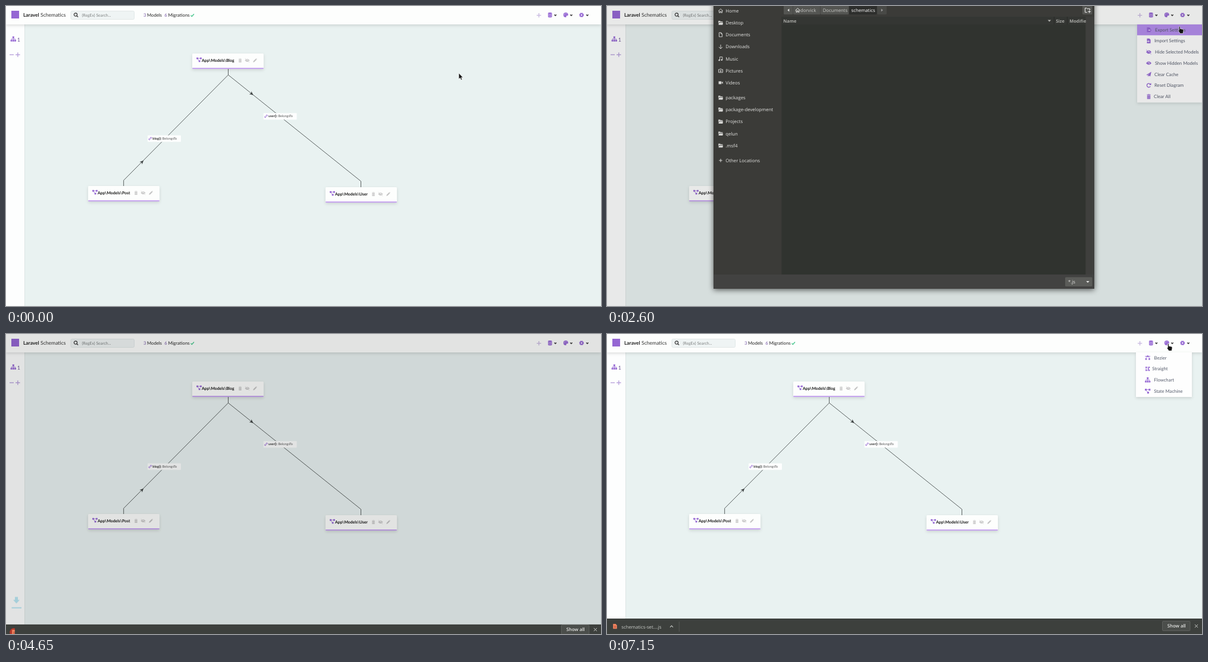
Animation, 1000 px wide and 505 px high, one loop 8000 ms. Source, as an HTML page:

```html
<!DOCTYPE html>
<html lang="en">
<head>
<meta charset="utf-8">
<title>Schematics</title>
<style>
html, body { margin: 0; width: 100%; height: 100%; overflow: hidden; background: #e9f2f1; }
svg { display: block; width: 100vw; height: 100vh; font: 7.7px Lato, sans-serif; text-rendering: geometricPrecision; }
text { white-space: pre; }
.b { font-weight: 700; }
.ui { font-family: "Open Sans", "Noto Sans", sans-serif; font-size: 7.75px; }
.ln { fill: none; stroke: currentColor; }
.menu { fill: #555b6b; }
.purple { color: #9567d3; }

.move, .arrow, .hand, .gears, .hover, .dialog, .rules, .dim, .shelf, .tools, .cover, .ring, .drop, .styles {
  animation: 8s linear infinite;
}
.arrow, .hand, .hover, .dialog, .rules, .ring { animation-timing-function: step-end; }
.move { animation-name: move; }
.arrow { animation-name: arrow; }
.hand { animation-name: hand; }
.gears { animation-name: gears; }
.hover { animation-name: hover; }
.dialog { animation-name: dialog; }
.rules { animation-name: rules; }
.dim { animation-name: dim; }
.shelf { animation-name: shelf; }
.tools { animation-name: tools; }
.cover { animation-name: cover; }
.ring { animation-name: ring; }
.drop { animation-name: drop; }
.styles { animation-name: styles; }

@keyframes move {
  0%, .3% { transform: translate(761px, 113px); animation-timing-function: ease-in-out; }
  10.6%, 19% { transform: translate(971px, 15px); }
  23.7%, 26% { transform: translate(962px, 38px); }
  29.3%, 39.3% { transform: translate(960px, 34px); }
  40%, 43.5% { transform: translate(946px, 26px); }
  46.5% { transform: translate(800px, -20px); }
  70.6% { transform: translate(862px, 5px); }
  71.8%, 82.8% { transform: translate(924px, 25px); }
  84.9%, 100% { transform: translate(941px, 16px); }
}
@keyframes arrow {
  0%, 39.375%, 70.625% { opacity: 1; }
  10%, 46.5%, 84.375%, 100% { opacity: 0; }
}
@keyframes hand {
  0%, 39.375% { opacity: 0; }
  10%, 84.375%, 100% { opacity: 1; }
}
@keyframes gears {
  0%, 11.1% { opacity: 0; }
  12.6%, 56.24% { opacity: 1; }
  56.25%, 100% { opacity: 0; }
}
@keyframes hover { 0% { opacity: 0; } 21.25%, 100% { opacity: 1; } }
@keyframes dialog { 0%, 56.25%, 100% { opacity: 0; } 32.5% { opacity: 1; } }
@keyframes rules { 0% { opacity: 0; } 39.375%, 100% { opacity: 1; } }
@keyframes dim {
  0%, 31.9% { opacity: 0; }
  32.5% { opacity: .08; }
  35.6%, 56.2% { opacity: .32; }
  58.125% { opacity: .105; }
  60%, 100% { opacity: 0; }
}
@keyframes shelf {
  0%, 56.7% { transform: translateY(27px); }
  58.125% { transform: translateY(10px); }
  59.4%, 100% { transform: none; }
}
@keyframes tools {
  0%, 56.7% { transform: translateY(24px); }
  58.125% { transform: translateY(6px); }
  59.4%, 100% { transform: none; }
}
@keyframes cover {
  0%, 57% { transform: none; }
  58.125% { transform: translateX(14px); }
  60%, 100% { transform: translateX(140px); }
}
@keyframes ring { 0% { opacity: 1; } 83.125% { opacity: .5; } 88.75%, 100% { opacity: 0; } }
@keyframes drop {
  0%, 56.3% { opacity: 0; transform: translateY(-18px); }
  58.125% { opacity: 1; transform: none; }
  60%, 100% { opacity: 0; transform: translateY(18px); }
}
@keyframes styles { 0%, 88.2% { opacity: 0; } 89.3%, 100% { opacity: 1; } }
</style>
</head>
<body>
<svg id="stage" viewBox="0 0 1000 505"></svg>
<script>
// Icons are drawn around their own centre, about 8px wide.
const fill = d => `<path fill="currentColor" d="${d}"/>`;
const line = (d, w = 1) => `<path class="ln" stroke-width="${w}" d="${d}"/>`;
const gap = (d, w = .8) => `<path fill="none" stroke="#fff" stroke-width="${w}" d="${d}"/>`;
const page = 'M-3-4H1L3-2V4H-3Z';
const eye = 'M-4.5 0Q0-5.6 4.5 0Q0 5.6-4.5 0Z';

const icons = {
  plus: line('M-3.7 0H3.7M0-3.7V3.7', 1.4),
  minus: line('M-3.5 0H3.5', 1.4),
  chevron: line('M-1.7-.8L0 .9L1.7-.8', 1.4),
  search: line('M1.8 1.8L4 4', 1.5) + '<circle class="ln" stroke-width="1.3" cx="-.6" cy="-.6" r="2.9"/>',
  check: line('M-2.7 .2L-.8 2L2.8-2', 1.3),
  db: fill('M-3.4-2.8C-3.4-4.6 3.4-4.6 3.4-2.8V2.8C3.4 4.6-3.4 4.6-3.4 2.8Z') + gap('M-3.4-1.6Q0-.2 3.4-1.6M-3.4 1.2Q0 2.6 3.4 1.2', .6),
  palette: fill('M4 0A4 4 0 1 0 0 4Q1.4 3.8.8 2.5Q.4 1.2 1.8 1.2H3Q4 1.1 4 0Z') + gap('M-2.6 0h1M-1.7-2h1M.9-2h1', 1),
  gear: '<circle class="ln" stroke-width="1.8" r="2.1"/><circle class="ln" stroke-width="1.4" stroke-dasharray="1.5 1.02" r="3.2"/>',
  tree: fill('M-1.5-4.3h3v2.7h-3ZM-4.6 1.5h2.7V4.2h-2.7ZM-1.4 1.5h2.8V4.2h-2.8ZM1.9 1.5h2.7V4.2H1.9Z') + line('M0-2V2M-3.2 1.5V0H3.2V1.5', .8),
  flow: fill('M-4.6-4h3v3h-3ZM1.6-4h3v3h-3ZM-.8 1h3v3h-3Z') + line('M-2-2.5H2M-2.6-1.5L.2 2', .8),
  trash: fill('M-3-3.6h2l.4-.6h1.2l.4 .6h2v1h-6ZM-2.7-2H2.7V4.2H-2.7Z') + gap('M-1.2-1V3.2M1.2-1V3.2', .5),
  eye: fill(eye) + gap('M-1.4 0A1.4 1.4 0 1 1 0 1.4', .8),
  eyeOff: fill(eye) + gap('M-1.2 .4A1.3 1.3 0 0 1 1.3-.3M-4-4.2L4.4 3.2', .7) + line('M-4.2-3.5L4.2 3.7', .8),
  pencil: fill('M-3.8 3.8L-3.2 1.4L1.5-3.2L3.3-1.4L-1.4 3.2ZM2-3.6L2.7-4.1L4.1-2.7L3.7-2Z'),
  output: fill(page) + gap('M-.6 .8H3', 1) + fill('M2.7-1.2L4.8 .8L2.7 2.8Z'),
  input: fill(page) + gap('M-4 .8H.4M-.7-.8L.9 .8L-.7 2.4', .9),
  plane: fill('M-4.2 1L4.3-4.2L2.6 3.6L0 2.3L-1.4 4.2V1.7L2.6-2.4L-2.2 1.7Z'),
  redo: line('M2.6-2.1A3.2 3.2 0 1 0 2.8 1.6', 1.3) + fill('M4-4.2V-.7H.5Z'),
  bezier: fill('M-1.3-3.7h2.6v2.5h-2.6ZM-4 1h2.5v2.7H-4ZM1.5 1H4v2.7H1.5Z') + line('M-4.4-2.4H4.4M-2.8 1Q-2.7-2-1-2.4M2.8 1Q2.7-2 1-2.4', .8),
  polygon: line('M-2.6-2.6H2.6L1 0L2.6 2.6H-2.6Z', .9) + fill('M-3.6-3.6h2v2h-2ZM1.6-3.6h2v2h-2ZM1.6 1.6h2v2h-2ZM-3.6 1.6h2v2h-2ZM0-1h2v2H0Z'),
  link: line('M-1.1 1.1L1.1-1.1M-.2-1.2L.9-2.3A1.4 1.4 0 0 1 2.4-.8L1.3 .2M.2 1.2L-.9 2.3A1.4 1.4 0 0 1-2.4 .8L-1.3-.2', .9),
  home: line('M-4 .3L0-3.4L4 .3M-2.7-.5V3.5H-.8V1H.8V3.5H2.7V-.5', 1),
  folder: fill('M-4-3.5H-1L0-2.4H3.6V-1H-3L-4 2.5ZM-2.6-.3H4.3L3.6 3.5H-3.8Z'),
  doc: line('M-2.7-3.7H.7L2.8-1.6V3.7H-2.7ZM.6-3.5V-1.4H2.6', 1),
  down: line('M0-3.8V3.4M-3.2 .4L0 3.6L3.2 .4', 1),
  music: line('M-1.5 2.5V-3.2H3V1.8', 1) + fill('M-4 2.6a1.5 1.3 0 1 0 3 0a1.5 1.3 0 1 0-3 0M.4 2a1.5 1.3 0 1 0 3 0a1.5 1.3 0 1 0-3 0'),
  camera: line('M-3.7-2.2H-1.8L-1-3.2H1L1.8-2.2H3.7V3H-3.7Z', 1) + '<circle class="ln" r="1.3" cy=".4"/>',
  video: fill('M-3.6-2.4H1.4V2.4H-3.6ZM1.6 0L4-2.2V2.2Z'),
};

const icon = (name, x, y, color = '', scale = 1) =>
  `<g transform="translate(${x} ${y}) scale(${scale})"${color && ` color="${color}"`}>${icons[name]}</g>`;
const text = (x, y, s, attrs = '') => `<text x="${x}" y="${y}" ${attrs}>${s}</text>`;
const rect = (x, y, w, h, color, attrs = '') =>
  `<rect x="${x}" y="${y}" width="${w}" height="${h}" fill="${color}" ${attrs}/>`;

const card = (x, y, name) => `<g transform="translate(${x} ${y})">
  ${rect(0, 0, 120, 26, '#fdfefd', 'rx="1.5" filter="url(#soft)"')}${rect(0, 24, 120, 2, '#c7a6ef', 'rx="1"')}
  ${icon('flow', 11.5, 10.5, '#9567d3', .95)}
  ${text(16, 14, 'App\\Models\\' + name, 'class="b" font-size="6.85" fill="#151515"')}
  ${icon('trash', 80.5, 11.7, '#cacaca', .8)}${icon('eyeOff', 92.5, 11.5, '#cacaca', .9)}${icon('pencil', 105.5, 11.5, '#c4c4c4', .85)}</g>`;

const label = (x, y, name) => `<g transform="translate(${x} ${y})">
  ${rect(0, 0, 56, 11, '#fdfefe', 'rx="1"')}${icon('link', 4.3, 5.4, '#9567d3')}
  <text x="8.3" y="7.3" font-size="5.55" fill="#555"><tspan class="b" fill="#333">${name}():</tspan> BelongsTo</text></g>`;

const head = (x, y, angle) =>
  `<path d="M0 0L-6.5-3L-4.6 0L-6.5 3Z" fill="#3f4444" transform="translate(${x} ${y}) rotate(${angle})"/>`;

const menu = (x, w, iconX, rows) =>
  rect(x, 31, w, rows.length * 18.75, '#fefefe', 'filter="url(#soft)"') +
  (rows.length > 4 ? rect(x, 31, w, 18.3, '#b48eec', 'class="hover"') : '') +
  rows.map(([name, tx, s], i) => {
    const y = 39.9 + i * 18.75;
    return `<g class="purple">${icon(name, iconX, y)}</g>` + text(tx, y + 2.7, s, 'class="menu"');
  }).join('');

const header = `
  ${rect(0, 0, 1000, 31, '#fdfefd', 'filter="url(#soft)"')}
  ${rect(9, 8, 13, 13, '#9567d3')}
  ${text(29, 18.2, 'Laravel', 'class="b" font-size="8.4" fill="#222"')}
  ${text(58, 18.2, 'Schematics', 'font-size="8.6" fill="#333"')}
  ${rect(109, 8.5, 106.5, 14, '#eff4f4', 'rx="2" stroke="#dce4e4" stroke-width=".8"')}
  ${icon('search', 117.5, 15, '#333', .9)}
  ${text(127.5, 17.7, '(RegEx) Search...', 'font-size="6.85" fill="#7d8080"')}
  ${text(231, 18, '3', 'fill="#7a5ca8"')}${text(237, 18, 'Models', 'fill="#222"')}
  ${text(266.3, 18, '6', 'fill="#7a5ca8"')}${text(272.4, 18, 'Migrations', 'fill="#222"')}
  ${icon('check', 313.2, 15.5, '#48c78e')}
  ${icon('plus', 895.6, 15.6, '#c8b9e0')}
  <g class="purple">${icon('db', 914.3, 15.2)}${icon('palette', 940.8, 15)}${icon('gear', 967.3, 15.2)}</g>
  ${[923.3, 950, 977].map(x => icon('chevron', x, 15.4, '#333')).join('')}`;

const diagram = `
  <path d="M373.5 106V116L197.7 293.5V303M373.5 116L596.5 295V305" fill="none" stroke="#4a5050" stroke-width=".9"/>
  ${head(231.2, 260, -45.3)}${head(415.6, 150, 38.7)}
  ${label(238, 217.7, 'blog')}${label(432.7, 180.2, 'user')}
  ${card(313, 80, 'Blog')}${card(138, 303, 'Post')}${card(537, 305, 'User')}`;

const side = `
  ${rect(0, 31, 31, 474, '#fdfefe')}${rect(31, 31, .8, 474, '#d9e2e1')}
  ${icon('tree', 12.3, 55.5, '#9567d3')}${text(18.8, 59.8, '1', 'font-size="9" fill="#6f5a95"')}
  ${icon('minus', 9.5, 82, '#b9a4dd')}${icon('plus', 19.8, 82, '#b9a4dd')}`;

const places = [
  [8, 'home', 'Home'], [28.3, 'folder', 'Desktop'], [48.3, 'doc', 'Documents'], [68.6, 'down', 'Downloads'],
  [88.8, 'music', 'Music'], [109, 'camera', 'Pictures'], [129.1, 'video', 'Videos'],
  [154.3, 'folder', 'packages'], [174.4, 'folder', 'package-development'], [194.6, 'folder', 'Projects'],
  [214.7, 'folder', 'qelun'], [235, 'folder', '.msf4'], [260, 'plus', 'Other Locations'],
];
const crumb = (x, w, color = '#545552') => rect(x, -6, w, 20.3, color, 'rx="1.5"');

const dialog = `<g class="dialog ui" fill="#e4e4e2">
  ${rect(179, -30, 640, 506, '#3a3a38', 'filter="url(#deep)"')}
  ${rect(179, 452, 640, 24, '#424241')}
  ${rect(293.5, 18, 511, 434, '#30332f')}${rect(293.5, 18, 511, 13, '#343633')}
  ${rect(804.5, 18, 14.5, 434, '#3f3f3d')}
  ${crumb(297, 15.5)}${crumb(313, 45.5)}${crumb(359, 47.3)}${crumb(407, 46.5, '#2d2e2c')}${crumb(454, 16, '#484946')}${crumb(799, 16.5)}
  <path d="M306.3 4.5V9.5L303.3 7Z"/><path d="M460.8 4.5V9.5L463.8 7Z" fill="#999"/>
  ${icon('home', 320.5, 7, '#e8e8e6', .95)}
  ${text(325, 9.9, 'dorvick', 'fill="#c9c9c6"')}${text(362.7, 9.9, 'Documents', 'fill="#c9c9c6"')}
  ${text(410.5, 9.9, 'schematics', 'fill="#fff"')}
  <path class="ln" color="#eee" d="M807 10.7H803.5V3.5H806L807 4.7H811.5V7M808.5 9.5H813M810.7 7.3V11.8"/>
  <g class="b" fill="#a9aaa6" font-size="7.4">${text(296.3, 27.7, 'Name')}${text(754.5, 27.7, 'Size')}${text(777.3, 27.7, 'Modifie')}</g>
  <path d="M740.7 23.5H746.3L743.5 26.5Z" fill="#b5b5b2"/>
  ${rect(751, 18, .8, 13, '#272926')}${rect(773, 18, .8, 13, '#272926')}
  ${places.map(([y, name, s]) => icon(name, 191, y, '#d5d5d3', name === 'plus' ? .75 : .95) + text(199.3, y + 2.8, s)).join('')}
  <g class="rules">${rect(181, 141.3, 112, .8, '#313230')}${rect(181, 247, 112, .8, '#313230')}</g>
  ${rect(770, 456.5, 45.5, 15.5, '#5b5c59', 'rx="1.5"')}${text(775, 467, '*.js')}
  <path d="M805.3 463H810.7L808 466Z"/></g>`;

const shelf = `
  <g class="shelf">
    ${rect(0, 479, 1000, 28, '#3d403d')}
    <g class="ring"><circle cx="13.4" cy="492.3" r="7.2" fill="#b53a2c"/></g>
    <path d="M10.2 488H14.6L16.7 490.2V496.3H10.2Z" fill="#f0835f"/><path d="M12 492H15M12 494H15" stroke="#a8402c" stroke-width=".8"/>
    ${text(24.3, 495.5, 'schematics-set….js', 'class="ui" font-size="8" fill="#c9cbc8"')}
    <path class="ln" color="#c4c6c3" stroke-width="1.1" d="M106 493.6L108.5 491L111 493.6"/>
    ${rect(120.8, 484, .8, 17, '#5b5e5b')}
    <g class="cover">${rect(0, 480, 140, 27, '#3d403d')}</g>
  </g>
  <g class="tools">
    ${rect(933.5, 483.5, 46.5, 16, '#4b4e4b', 'rx="1.5" stroke="#656865" stroke-width=".8"')}
    ${text(941.8, 494.3, 'Show all', 'class="ui" font-weight="600" fill="#e6e7e5"')}
    <path class="ln" color="#c9cbc8" d="M987.9 489L993.1 494.2M993.1 489L987.9 494.2"/>
  </g>
  <g class="drop" fill="#a6cfda"><path d="M15 442.5H20V447.5H23L17.5 453.5L12 447.5H15Z"/>${rect(9.5, 459.8, 16.5, 2, '#a6cfda')}</g>`;

const cursor = `<g class="move" fill="#141414" stroke="#fff" stroke-width=".6" stroke-linejoin="round">
  <path class="arrow" d="M0 0V10L2.3 8L3.9 11.6L5.6 10.8L4.1 7.4H7Z"/>
  <path class="hand" d="M1.2 .9Q2.2-.4 3.3 .9V4.3L7.8 5.2Q9.2 5.7 9 7.4L8.1 12.3H3.2L.2 7.8Q0 6.5 1.5 6.9Z"/></g>`;

document.getElementById('stage').innerHTML = `
  <defs>
    <filter id="soft" x="-20%" y="-50%" width="140%" height="220%"><feDropShadow dx="0" dy="2" stdDeviation="2.5" flood-opacity=".13"/></filter>
    <filter id="deep" x="-5%" y="-5%" width="110%" height="110%"><feDropShadow dx="0" dy="2" stdDeviation="5" flood-opacity=".6"/></filter>
  </defs>
  ${rect(0, 0, 1000, 505, '#e9f2f1')}${diagram}${side}${header}
  <g class="gears">${menu(891, 109, 910.5, [
    ['output', 921, 'Export Settings'], ['input', 920, 'Import Settings'], ['eyeOff', 921, 'Hide Selected Models'],
    ['eye', 921, 'Show Hidden Models'], ['plane', 920, 'Clear Cache'], ['redo', 920, 'Reset Diagram'], ['trash', 919, 'Clear All'],
  ])}</g>
  <g class="styles">${menu(889, 94, 908.7, [
    ['bezier', 919.5, 'Bezier'], ['polygon', 916.3, 'Straight'], ['tree', 919.3, 'Flowchart'], ['flow', 919.3, 'State Machine'],
  ])}</g>
  <g class="dim">${rect(0, 0, 1000, 505, '#000')}</g>
  ${dialog}${shelf}${cursor}`;
</script>
</body>
</html>
```
